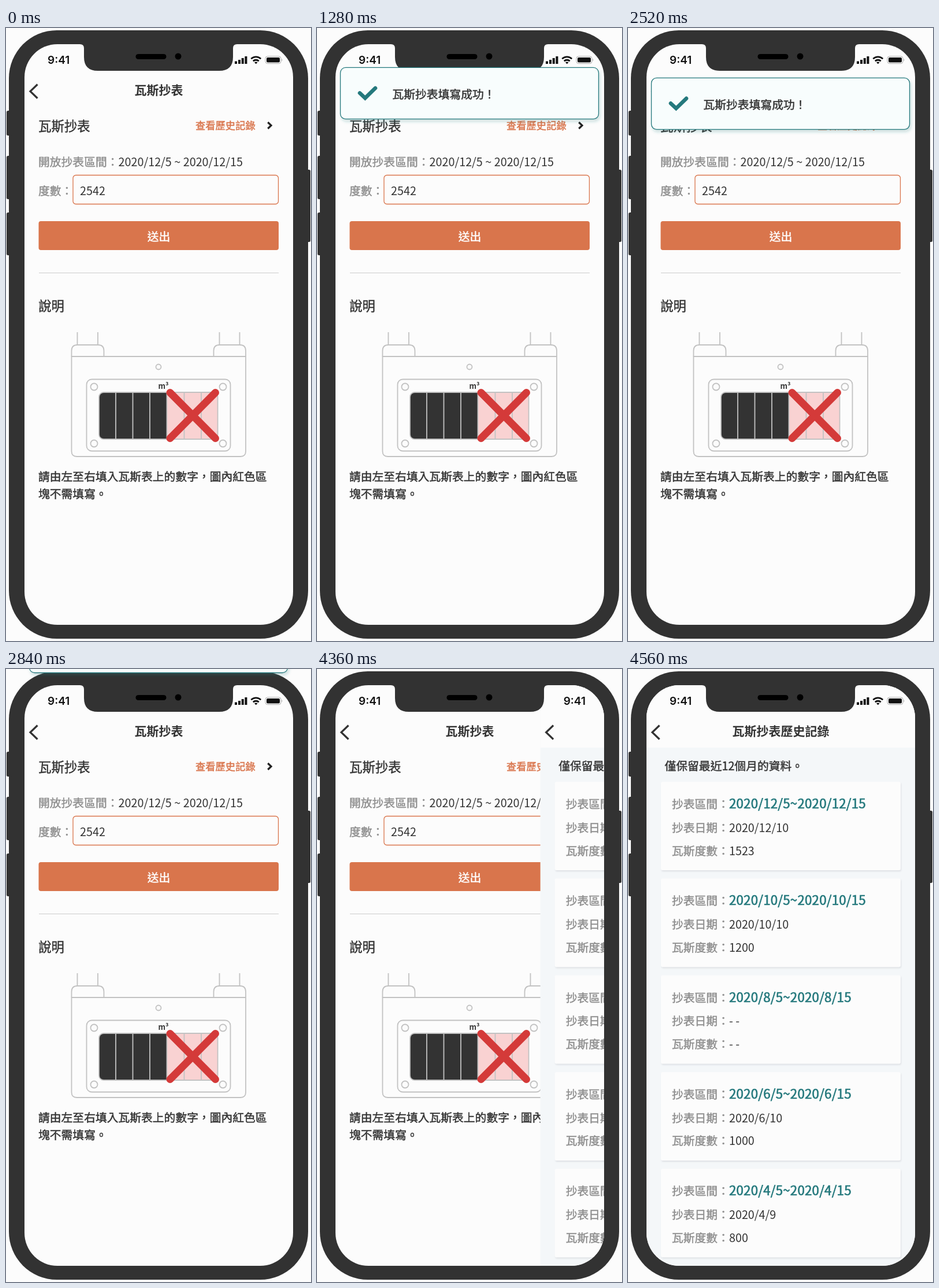
Animation of 528 by 1060 pixels, one loop 6 s. Source, as an HTML page:

```html
<!DOCTYPE html>
<html lang="zh-Hant">
<head>
<meta charset="utf-8">
<title>瓦斯抄表</title>
<style>
  html, body { margin: 0; width: 100%; height: 100%; overflow: hidden; background: #fcfcfc; }
  svg { display: block; width: 100%; height: 100%; }
  text { font: 400 19.8px "Noto Sans CJK TC", "Noto Sans CJK JP", "Noto Sans CJK", sans-serif; white-space: pre; }
  text, tspan { fill: currentColor; }
  svg, .value { color: #333; }
  /* A thin outline turns the regular weight into a medium one */
  .medium, .label, .heading, .period { stroke: currentColor; stroke-width: .45px; }
  .label { color: #8e8e8e; }
  .value { stroke: none; }
  .heading { font-size: 22.3px; }
  .title { font-weight: 700; font-size: 21px; text-anchor: middle; }
  .period { font-size: 22.3px; letter-spacing: .2px; stroke-width: .7px; color: #25797d; }
  .clock { font: 600 19px Inter, sans-serif; color: #111; }
  .line { fill: none; stroke: #c2c2c2; stroke-width: 1.8; }
</style>
</head>
<body>
<svg viewBox="0 0 528 1060">
  <defs>
    <clipPath id="screen"><rect x="32" y="28" width="465" height="1004" rx="57"/></clipPath>
    <clipPath id="counter"><rect x="161" y="630" width="206" height="81" rx="8"/></clipPath>
    <filter id="toastShadow" x="-10%" y="-20%" width="120%" height="150%">
      <feDropShadow dx="2" dy="4" stdDeviation="2.5" flood-color="#25797d" flood-opacity=".22"/>
    </filter>
    <filter id="cardShadow" x="-5%" y="-5%" width="110%" height="115%">
      <feDropShadow dx="1" dy="2" stdDeviation="1.3" flood-color="#445" flood-opacity=".13"/>
    </filter>
    <g id="topBar">
      <text class="clock" x="72" y="62">9:41</text>
      <path d="M398 62v-4.500M404 62v-7M409.700 62v-10M415.400 62v-13" stroke="#111" stroke-width="4"/>
      <g fill="none" stroke="#111" stroke-width="2.800">
        <path d="M424.300 53.300a12.200 12.200 0 0 1 16.900 0M427.800 57.200a7.200 7.200 0 0 1 9.900 0"/>
        <path d="M430 59.500q2.750-2 5.500 0l-2.750 2.800z" fill="#111" stroke="none"/>
      </g>
      <rect x="449" y="49" width="27" height="12.500" rx="3.800" fill="none" stroke="#aaa"/>
      <rect x="451" y="51" width="23" height="8.500" rx="2" fill="#111"/>
      <path d="M477.500 53.300q2 2 0 4z" fill="#aaa"/>
      <path d="M54.500 97.500 42 109.500l12.500 12" fill="none" stroke="#333" stroke-width="3.200"/>
    </g>
  </defs>

  <g fill="#323232">
    <rect x="5" y="4" width="518" height="1052" rx="83"/>
    <rect x="1" y="143" width="10" height="43" rx="2.500"/>
    <rect x="1" y="221" width="10" height="75" rx="2.500"/>
    <rect x="1" y="319" width="10" height="74" rx="2.500"/>
    <rect x="517" y="245" width="10" height="125" rx="2.500"/>
  </g>

  <g clip-path="url(#screen)">
    <g id="formPage">
      <rect x="32" y="28" width="465" height="1004" fill="#fcfcfc"/>
      <use href="#topBar"/>
      <text class="title" x="264.500" y="115">瓦斯抄表</text>
      <text class="heading" x="56.300" y="177.500">瓦斯抄表</text>
      <text class="medium" x="328" y="175.300" style="font-size:17.3px;color:#d9754c">查看歷史記錄</text>
      <path d="M453.300 163l5.700 5.500-5.700 5.500" fill="none" stroke="#222" stroke-width="3.200"/>
      <text class="label" x="56" y="238.500">開放抄表區間：<tspan class="value">2020/12/5 ~ 2020/12/15</tspan></text>
      <text class="label" x="56" y="288.500">度數：</text>
      <rect x="116" y="254.500" width="355.500" height="50" rx="5" fill="none" stroke="#d9754c" stroke-width="1.300"/>
      <text x="128" y="288.500">2542</text>
      <rect x="56.500" y="334" width="415.500" height="50" rx="4" fill="#d9754c"/>
      <text class="medium" x="264.500" y="367.500" text-anchor="middle" style="color:#fff">送出</text>
      <path d="M57 423.500H472" stroke="#ccc"/>
      <text class="heading" x="56.300" y="489">說明</text>

      <g class="line">
        <path d="M123.500 526V548M159 526V548M369.500 526V548M404.500 526V548"/>
        <path d="M113.500 568V558q0-10 10-10H159.500q10 0 10 10V568M359.500 568V558q0-10 10-10H405q10 0 10 10V568"/>
        <path d="M113.500 568H415V732q0 9-9 9H122.500q-9 0-9-9z"/>
        <circle cx="264" cy="586" r="4.500"/>
        <rect x="139.500" y="607.500" width="249" height="124" rx="9"/>
        <circle cx="152.500" cy="620.500" r="6"/><circle cx="375.500" cy="620.500" r="6"/>
        <circle cx="152.500" cy="718.500" r="6"/><circle cx="375.500" cy="718.500" r="6"/>
      </g>
      <text x="272.500" y="623.500" text-anchor="middle" style="font-size:13px;font-weight:700">m³</text>
      <g clip-path="url(#counter)">
        <rect x="161" y="630" width="118" height="81" fill="#333"/>
        <rect x="279" y="630" width="88" height="81" fill="#f9d2d2"/>
      </g>
      <path class="line" d="M190 630v81M219.500 630v81M249 630v81M278.500 630v81M308.500 630v81M338 630v81"/>
      <rect class="line" x="161" y="630" width="205.500" height="81" rx="8"/>
      <path d="M284 630.500l78.500 79M362.500 630.500l-78.500 79" stroke="#d43a39" stroke-width="13" stroke-linecap="round"/>

      <text class="medium" x="56" y="783">請由左至右填入瓦斯表上的數字，圖內紅色區</text>
      <text class="medium" x="56" y="812.500">塊不需填寫。</text>
    </g>

    <g id="historyPage">
      <rect x="32" y="28" width="465" height="1004" fill="#f4f7f9"/>
      <rect x="32" y="28" width="465" height="108" fill="#fcfcfc"/>
      <use href="#topBar"/>
      <text class="title" x="264.500" y="115">瓦斯抄表歷史記錄</text>
      <text class="medium" x="63.500" y="174.500">僅保留最近12個月的資料。</text>
      <g id="cards"></g>
    </g>
  </g>

  <path d="M128 26v2q7 0 7 7V50q0 24 24 24H369q24 0 24-24V35q0-7 7-7v-2z" fill="#323232"/>
  <rect x="224.500" y="45" width="53" height="9" rx="4.500"/>
  <circle cx="298" cy="49" r="5.500"/>

  <g id="toast">
    <rect x="40.500" y="112.500" width="447" height="89" rx="9" fill="#f8fdfd" stroke="#25797d" stroke-width="1.300" filter="url(#toastShadow)"/>
    <path d="M74 156.500l9.300 8.700L101 148" fill="none" stroke="#25797d" stroke-width="6.600" stroke-linecap="round"/>
    <text class="medium" x="130.500" y="166.500">瓦斯抄表填寫成功！</text>
  </g>
  <circle id="tap" r="36" fill="#25797d"/>
</svg>
<script>
const LOOP = 6000, STEP = 40;
const $ = id => document.getElementById(id);

const records = [
  ['2020/12/5~2020/12/15', '2020/12/10', '1523'],
  ['2020/10/5~2020/10/15', '2020/10/10', '1200'],
  ['2020/8/5~2020/8/15', '- -', '- -'],
  ['2020/6/5~2020/6/15', '2020/6/10', '1000'],
  ['2020/4/5~2020/4/15', '2020/4/9', '800'],
];
const row = (y, label, value, style) =>
  `<text class="label" x="76" y="${y}">${label}：<tspan class="${style}">${value}</tspan></text>`;
$('cards').innerHTML = records.map(([period, date, reading], i) => `
  <g transform="translate(0 ${i * 167.3})">
    <rect x="57" y="195" width="415" height="153" rx="3" fill="#fcfcfc" filter="url(#cardShadow)"/>
    ${row(241, '抄表區間', period, 'period')}
    ${row(281.8, '抄表日期', date, 'value')}
    ${row(321.5, '瓦斯度數', reading, 'value')}
  </g>`).join('');

// Eased progress from 0 to 1 between two times
const easeOut = (t, from, to) =>
  Math.sin(Math.min(1, Math.max(0, (t - from) / (to - from))) * Math.PI / 2);
const show = (el, on) => el.style.display = on ? '' : 'none';
const shift = (el, x, y) => el.setAttribute('transform', `translate(${x} ${y})`);

const taps = [
  { x: 329, y: 358.5, start: 340 },
  { x: 447.5, y: 168.5, start: 3500 },
];

function draw(t) {
  const tap = taps.find(({ start }) => t >= start && t < start + 620);
  show($('tap'), tap);
  if (tap) {
    const age = t - tap.start;
    shift($('tap'), tap.x, tap.y);
    $('tap').setAttribute('opacity', 0.15 * (easeOut(age, 0, 320) - easeOut(age, 340, 620)));
  }

  show($('toast'), t >= 1000 && t < 3360);
  shift($('toast'), 0, -195 * (1 - easeOut(t, 970, 1520) + easeOut(t, 2490, 2840)));

  show($('historyPage'), t >= 4360);
  shift($('historyPage'), 465 * (1 - easeOut(t, 4324, 4560)), 0);
}

function tick() {
  draw(Math.floor(performance.now() % LOOP / STEP) * STEP);
  requestAnimationFrame(tick);
}
tick();
</script>
</body>
</html>
```
